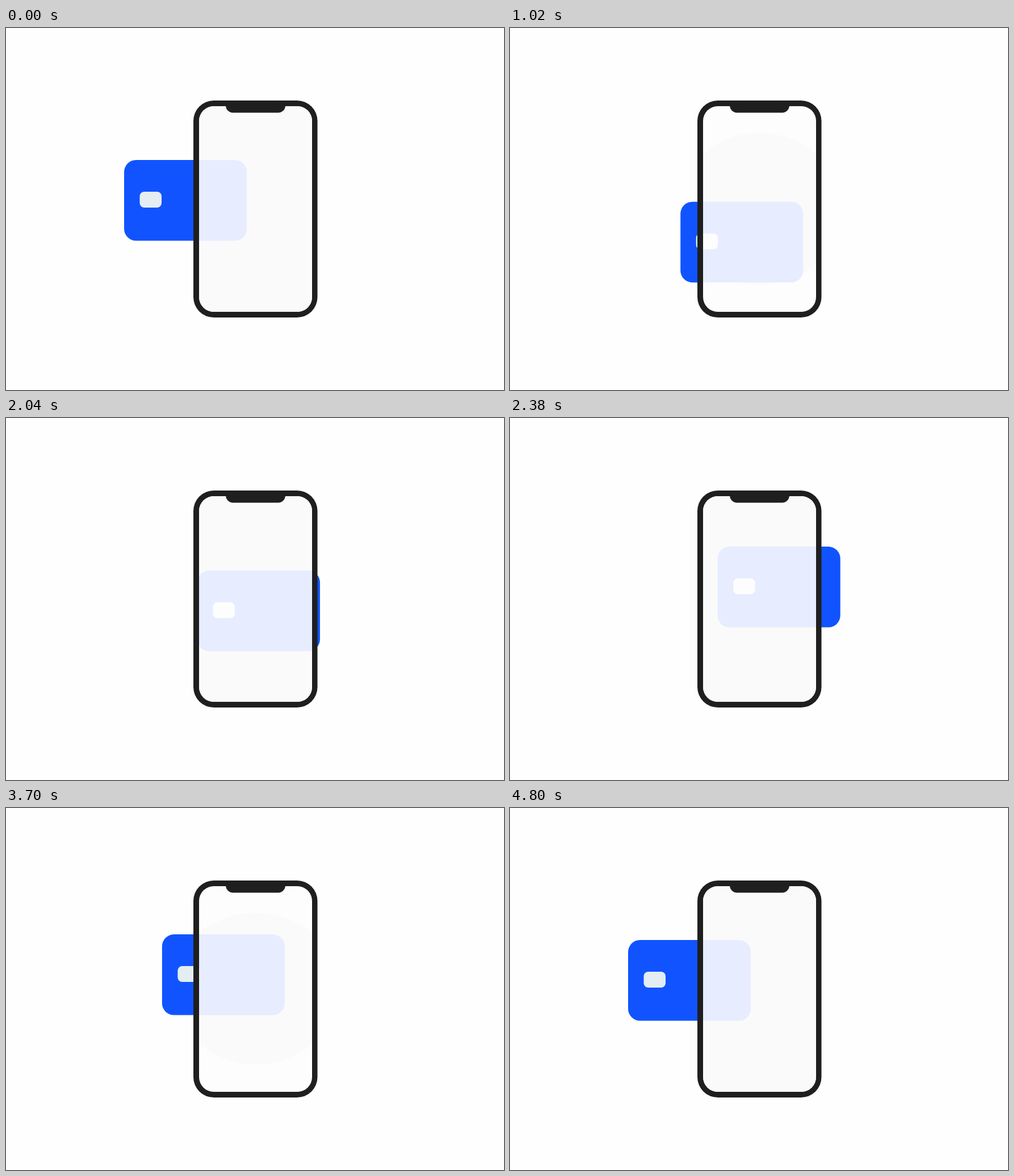
An HTML page that plays this animation: 877 by 639 pixels, repeating every 4820 ms.

```html
<!DOCTYPE html>
<html lang="en">
<head>
<meta charset="utf-8">
<title>Card and phone</title>
<style>
  html, body { margin: 0; width: 100%; height: 100%; overflow: hidden; background: #fefefe; }
  svg { display: block; width: 877px; height: 639px; }
</style>
</head>
<body>
<svg viewBox="0 0 877 639">
  <defs>
    <clipPath id="screen"><rect x="340" y="138" width="199" height="363" rx="26"/></clipPath>
  </defs>
  <g class="card">
    <rect width="216" height="142.5" rx="21" fill="#1154ff"/>
    <rect x="27.5" y="56" width="38.5" height="28" rx="8" fill="#e4edf1"/>
  </g>
  <rect x="330" y="128" width="218.5" height="383" rx="36" fill="#1f1f1f"/>
  <g clip-path="url(#screen)">
    <rect x="340" y="138" width="199" height="363" fill="#fdfdfd"/>
    <ellipse id="glow" cx="439.5" cy="319" fill="#fafafa"/>
    <g class="card">
      <rect width="216" height="142.5" rx="21" fill="#e7ecff"/>
      <rect x="27.5" y="56" width="38.5" height="28" rx="8" fill="#fdfdfe"/>
    </g>
  </g>
  <path d="M387 137H492A12.5 12.5 0 0 1 479.5 149.5H399.5A12.5 12.5 0 0 1 387 137Z" fill="#1f1f1f"/>
</svg>
<script>
  const LOOP = 4820, MOVE = 1200, PULSE = 2340;
  const stops = [[208, 233], [307.5, 312.5], [379, 207.5], [208, 233]];
  const starts = [20, 1512, 3013];
  const cards = document.querySelectorAll('.card');
  const glow = document.getElementById('glow');

  function ease(u) {
    u = Math.min(1, Math.max(0, u));
    return u * u * (3 - 2 * u);
  }

  function cardPosition(t) {
    return [0, 1].map(axis => starts.reduce(
      (sum, start, i) => sum + (stops[i + 1][axis] - stops[i][axis]) * ease((t - start) / MOVE),
      stops[0][axis]));
  }

  // Shrinks quickly from beyond the screen, lingers, then grows back.
  function glowRadius(t) {
    const phase = (t - 30 + PULSE) % PULSE;
    const nearness = Math.abs(1 - 2 * phase / PULSE);
    return 134 + 2426 * nearness ** 5.5;
  }

  function draw(now) {
    const t = now % LOOP;
    const [x, y] = cardPosition(t);
    cards.forEach(card => card.setAttribute('transform', `translate(${x} ${y})`));
    const r = glowRadius(t);
    glow.setAttribute('rx', r * 1.07);
    glow.setAttribute('ry', r);
    requestAnimationFrame(() => draw(performance.now() - origin));
  }

  const origin = performance.now();
  draw(0);
</script>
</body>
</html>
```
